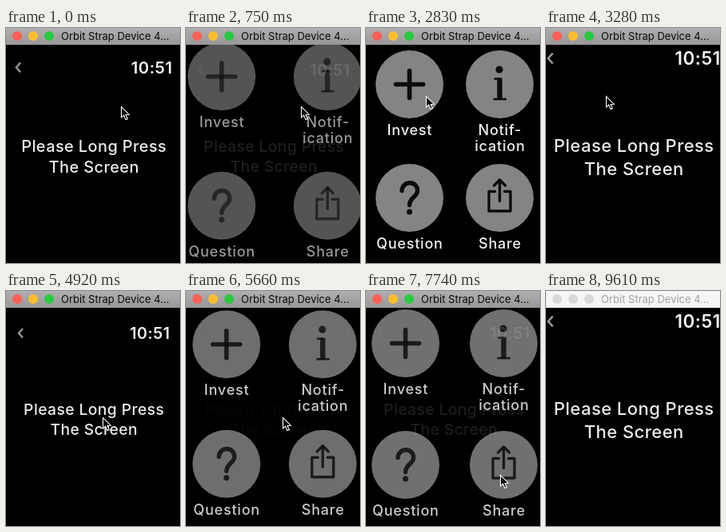
Write an HTML page with a canvas that moves like this. It is 218 by 294 pixels and loops after 9710 ms.

```html
<!DOCTYPE html>
<html lang="en">
<head>
<meta charset="utf-8">
<title>Watch menu</title>
<style>
html, body { margin: 0; width: 100%; height: 100%; overflow: hidden; background: #000; }
canvas { display: block; width: 218px; height: 294px; }
</style>
</head>
<body>
<canvas id="stage"></canvas>
<script>
const W = 218, H = 294, LOOP = 9710, BAR = 21;
const FONT = 'Inter, Roboto, sans-serif';
const REST = 0.877;
const canvas = document.getElementById('stage');
const ctx = canvas.getContext('2d');
const dpr = window.devicePixelRatio || 1;
canvas.width = W * dpr;
canvas.height = H * dpr;

// Number of steps taken in a run of evenly spaced changes.
function steps(t, start, end, count) {
  const k = Math.floor((t - start + 5) / ((end - start) / (count - 1))) + 1;
  return Math.max(0, Math.min(count, k));
}

const mix = (a, b, p) => a + (b - a) * p;
const easeOut = p => 1 - (1 - p) * (1 - p);

// Point on a polyline whose corners are [step, x, y].
function along(path, k) {
  let i = 1;
  while (i < path.length - 1 && path[i][0] < k) i++;
  const [k0, x0, y0] = path[i - 1], [k1, x1, y1] = path[i];
  const p = (k - k0) / (k1 - k0);
  return [mix(x0, x1, p), mix(y0, y1, p)];
}

const moves = [
  { run: [1500, 2540, 8], path: [[0, 144, 98], [3, 128, 126], [8, 75, 85]] },
  { run: [3880, 4320, 4], path: [[0, 75, 85], [4, 121, 158]] },
  { run: [6100, 6850, 6], path: [[0, 121, 158], [2, 124, 170], [6, 168, 230]] },
  { run: [8790, 9230, 4], path: [[0, 168, 230], [3, 184, 278], [4, 188, 298]] }
];

function cursorAt(t) {
  let pos = [144, 98];
  for (const m of moves) {
    const k = steps(t, ...m.run);
    if (k) pos = along(m.path, k);
  }
  return pos;
}

// Each exit step: menu spread, menu opacity, page opacity, page scale.
const exitA = [[1, 1, 0, REST], [6, 0.85, 0.12, REST], [18, 0.3, 0.6, 0.94], [0, 0, 1, 1]];
const exitB = [[0, 1, 0, REST], [1, 1, 0, REST], [6, 0.85, 0.12, REST], [7, 0.08, 0.85, 0.95], [0, 0, 1, 1]];

function stateAt(t) {
  const first = t < 3880;
  const open = first ? steps(t, 600, 1200, 5) : steps(t, 5360, 5950, 5);
  const exit = first ? steps(t, 2830, 3280, 4) : steps(t, 7450, 8040, 5);
  if (exit) {
    const [spread, menu, page, scale] = (first ? exitA : exitB)[exit - 1];
    return { spread, menu, page, scale };
  }
  const p = easeOut(open / 5);
  let scale = REST;
  if (first) scale = [0.906, 0.885, REST][steps(t, 150, 300, 2)];
  else if (t < 4915) scale = 1;
  return { spread: 30 * (1 - p), menu: p, page: (1 - p) ** 2, scale };
}

function text(str, x, y, size, weight, gap, align, color) {
  ctx.font = `${weight} ${size}px ${FONT}`;
  ctx.letterSpacing = gap + 'px';
  ctx.textAlign = align;
  ctx.fillStyle = color;
  ctx.fillText(str, align === 'center' ? x + gap / 2 : x, y);
}

function disc(x, y, r, color) {
  ctx.fillStyle = color;
  ctx.beginPath();
  ctx.arc(x, y, r, 0, 7);
  ctx.fill();
}

function line(width, color, ...points) {
  ctx.lineWidth = width;
  ctx.strokeStyle = color;
  ctx.beginPath();
  points.forEach(([x, y]) => ctx.lineTo(x, y));
  ctx.stroke();
}

const INK = '#0c0c0c';

function plus() {
  ctx.lineCap = 'round';
  line(5.6, INK, [-17, 0], [17, 0]);
  line(5.6, INK, [0, -17], [0, 17]);
}

function info() {
  disc(-0.5, -18.5, 4.6, INK);
  ctx.lineCap = 'butt';
  line(6.4, INK, [0, -8], [0, 19]);
  line(2.6, INK, [-7, -7], [1, -7]);
  line(2.6, INK, [-8, 18.5], [8.5, 18.5]);
}

function question() {
  ctx.lineCap = 'round';
  ctx.lineWidth = 5.4;
  ctx.strokeStyle = INK;
  ctx.beginPath();
  ctx.moveTo(-9.5, -9);
  ctx.bezierCurveTo(-9, -22, 10, -22, 10, -9);
  ctx.bezierCurveTo(10, -1, 0, -1, 0, 9);
  ctx.stroke();
  disc(0, 17.5, 3.5, INK);
}

function share() {
  ctx.lineCap = 'round';
  ctx.lineJoin = 'round';
  line(3.4, INK, [-6, -8], [-13.5, -8], [-13.5, 16.5], [13.5, 16.5], [13.5, -8], [6, -8]);
  line(3.4, INK, [0, 4], [0, -22]);
  line(3.4, INK, [-7, -15.5], [0, -22.5], [7, -15.5]);
}

const items = [
  { icon: plus, label: ['Invest'] },
  { icon: info, label: ['Notif-', 'ication'] },
  { icon: question, label: ['Question'] },
  { icon: share, label: ['Share'] }
];

function drawMenu(s) {
  items.forEach(({ icon, label }, i) => {
    const right = i % 2, low = i > 1;
    const x = right ? 166.5 + s.spread : 55.5 - s.spread;
    const y = low ? 211.5 + s.spread : 71.5 - s.spread;
    ctx.save();
    ctx.globalAlpha = s.menu;
    ctx.translate(x, y);
    disc(0, 0, 42.5, '#848484');
    icon();
    label.forEach((str, n) => text(str, 0, 63.5 + n * 20, 18, 500, 0.8, 'center', '#f0f0f0'));
    ctx.restore();
  });
}

function drawPage(s) {
  ctx.save();
  ctx.globalAlpha = s.page;
  ctx.translate(110, 158);
  ctx.scale(s.scale, s.scale);
  ctx.translate(-110, -158);
  ctx.lineCap = 'butt';
  ctx.lineJoin = 'miter';
  line(2.6, '#989898', [8.5, 31.5], [2.8, 38], [8.5, 44.5]);
  text('10:51', 161.5, 46, 22.5, 600, 0.5, 'left', '#f4f4f4');
  text('Please Long Press', 110, 154.5, 22, 500, 0.45, 'center', '#ececec');
  text('The Screen', 110, 183.5, 22, 500, 0.45, 'center', '#ececec');
  ctx.restore();
}

function drawBar(active) {
  const fill = ctx.createLinearGradient(0, 0, 0, BAR);
  fill.addColorStop(0, active ? '#b0aeb0' : '#f6f6f6');
  fill.addColorStop(1, active ? '#989698' : '#f4f4f4');
  ctx.fillStyle = fill;
  ctx.fillRect(0, 0, W, BAR);
  const lights = active ? ['#ff5f57', '#ffbd2e', '#28c940'] : Array(3).fill('#d8d8d8');
  lights.forEach((color, i) => disc(14 + i * 20, 10, 6, color));
  text('Orbit Strap Device 4...', 69, 15, 13, 400, 0, 'left', active ? '#0c0c0c' : '#a2a2a2');
}

function drawCursor(x, y) {
  ctx.save();
  ctx.translate(x, y);
  ctx.beginPath();
  [[0.5, 0.5], [0.5, 14], [3.6, 11.2], [6, 16.6], [8.3, 15.6], [6, 10.4], [10.2, 10.2]]
    .forEach(p => ctx.lineTo(...p));
  ctx.closePath();
  ctx.fillStyle = '#000';
  ctx.strokeStyle = '#fff';
  ctx.lineWidth = 1.1;
  ctx.lineJoin = 'miter';
  ctx.fill();
  ctx.stroke();
  ctx.restore();
}

function draw(t) {
  const s = stateAt(t);
  ctx.setTransform(dpr, 0, 0, dpr, 0, 0);
  ctx.fillStyle = '#000';
  ctx.fillRect(0, 0, W, H);
  if (s.menu > 0) drawMenu(s);
  if (s.page > 0) drawPage(s);
  drawBar(t < 9605);
  drawCursor(...cursorAt(t));
}

const began = performance.now();
function tick() {
  draw((performance.now() - began) % LOOP);
  requestAnimationFrame(tick);
}
tick();
</script>
</body>
</html>
```
